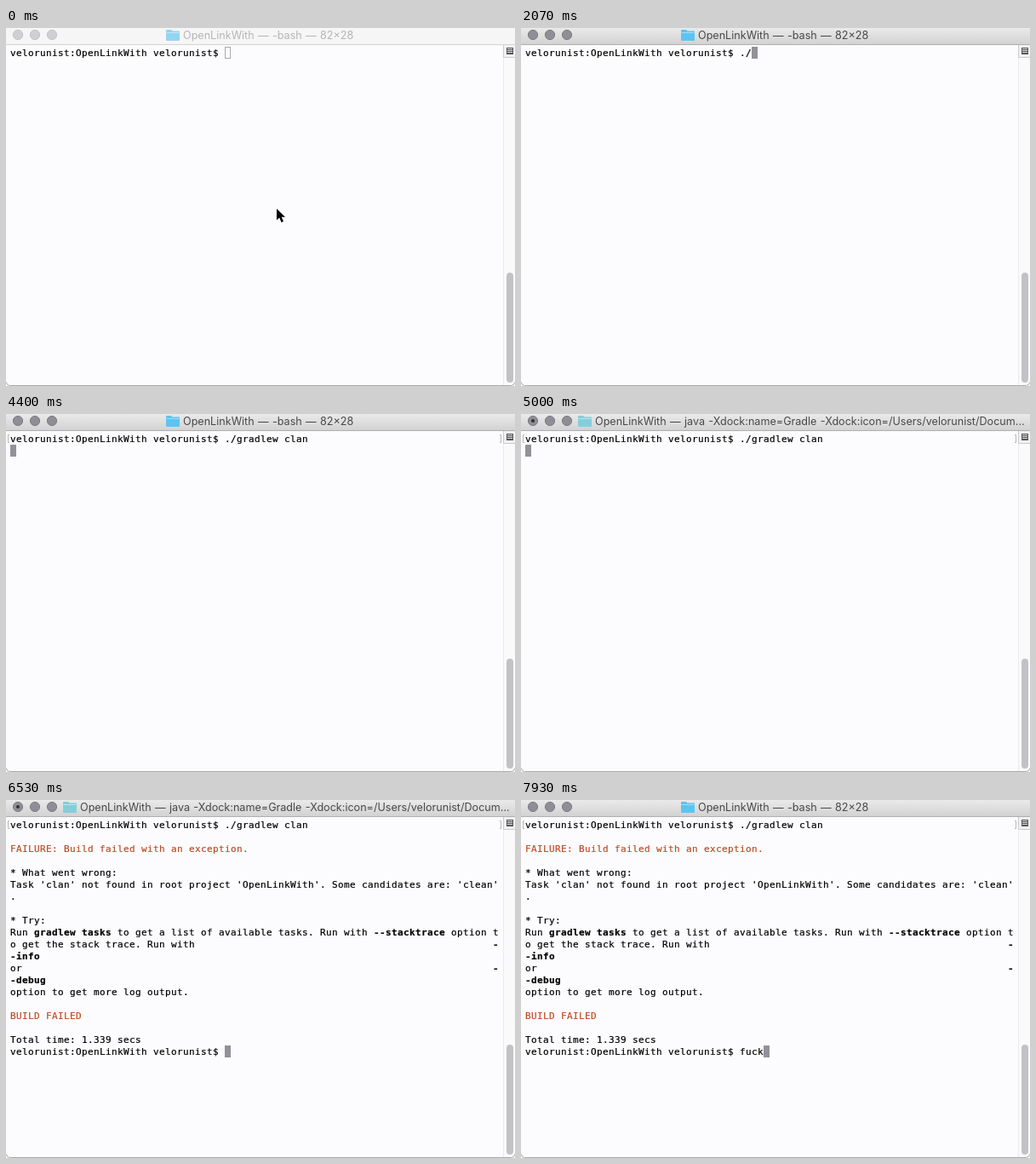
Recreate the animation shown at these times as an HTML page. Size 598x420 px, loop 8 s.

```html
<!DOCTYPE html>
<html lang="en">
<head>
<meta charset="utf-8">
<title>Terminal</title>
<style>
  html, body { margin: 0; width: 100%; height: 100%; overflow: hidden; background: #fcfcfe; }
  svg { display: block; width: 598px; height: 420px; }
  .mono { font: 11px "DejaVu Sans Mono", "Liberation Mono", monospace; stroke-width: .2; }
  .title { font: 12.6px Inter, Roboto, sans-serif; word-spacing: .8px; }
</style>
</head>
<body>
<svg id="stage" viewBox="0 0 598 420" xmlns="http://www.w3.org/2000/svg">
  <defs>
    <linearGradient id="activeBar" x2="0" y2="1">
      <stop offset="0" stop-color="#eaeaea"/>
      <stop offset="1" stop-color="#d2d2d2"/>
    </linearGradient>
  </defs>
  <rect width="598" height="420" fill="#fcfcfe"/>

  <g id="scrollbar">
    <rect x="584" y="20" width="14" height="399" fill="#fafafa"/>
    <path d="M584.5 20V419" stroke="#ebebee"/>
    <rect x="584.5" y="19.5" width="14" height="15" fill="#f2f2f2" stroke="#cbcbcd"/>
    <rect x="588.5" y="23.5" width="7" height="7" fill="#d6d6d8" stroke="#56565a"/>
    <path d="M589 25.5h6M589 27.5h6M589 29.5h6" stroke="#56565a"/>
    <rect x="588" y="287" width="8" height="129" rx="4" fill="#c2c1c5"/>
  </g>
  <path d="M.5 415.5Q.5 419.5 4.5 419.5H593.5Q597.5 419.5 597.5 415.5" fill="none" stroke="#a9a9ac"/>

  <rect id="bar" width="598" height="19"/>
  <path id="barEdge" d="M0 19.5H598"/>
  <g id="lights">
    <circle cx="14" cy="8" r="5.6"/>
    <circle cx="34" cy="8" r="5.6"/>
    <circle cx="54" cy="8" r="5.6"/>
  </g>
  <circle id="busyDot" cx="14" cy="8" r="2.1" fill="#333337"/>
  <g id="heading">
    <g id="folder">
      <path d="M0 3Q0 2 1 2H6L7.5 3.5H15Q16 3.5 16 4.5V14Q16 15 15 15H1Q0 15 0 14Z"/>
      <path d="M.5 5.5H15.5" stroke="#fff" stroke-opacity=".45"/>
    </g>
    <text id="title" class="title" x="20" y="13"></text>
  </g>

  <g id="screen" class="mono"></g>
  <rect id="caret"/>
  <path id="arrow" d="M0 0V13.5L3.2 10.6L5.5 16L8 15L5.7 9.8H10Z" fill="#000" stroke="#fff" stroke-width="1.2" paint-order="stroke"/>
  <path id="beam" d="M-3.5 -7.5Q-.5 -7.5 0 -5.5Q.5 -7.5 3.5 -7.5M0 -6V6M-3.5 7.5Q-.5 7.5 0 5.5Q.5 7.5 3.5 7.5M-1.5 .5H1.5" fill="none" stroke="#222"/>
</svg>
<script>
const LOOP = 8000, COL = 7, ROW = 14, LEFT = 5, TOP = 22;
const USER = 'velorunist', PROJECT = 'OpenLinkWith';
const PROMPT = `${USER}:${PROJECT} ${USER}$ `;
const T = { move: 930, active: 1067, type: 1600, enter: 4400, busy: 4467,
  javaTitle: 5000, configure: 5470, output: 5870, prompt: 6530, bashTitle: 6930 };

const COMMAND = './gradlew clan';
const COMMAND_KEYS = [1600, 1870, 2530, 2670, 2800, 2930, 3070, 3200, 3470, 3670, 3870, 4000, 4070, 4200];
const RETRY = 'fuck';
const RETRY_KEYS = [7600, 7670, 7800, 7930];

const BASH_TITLE = `${PROJECT} — -bash — 82×28`;
const JAVA_TITLE = `${PROJECT} — java -Xdock:name=Gradle -Xdock:icon=/Users/${USER}/Docum...`;

// "~" toggles bold, a leading "!" marks an error line
const OUTPUT = [
  '',
  '!FAILURE: Build failed with an exception.',
  '',
  '* What went wrong:',
  `Task 'clan' not found in root project '${PROJECT}'. Some candidates are: 'clean'`,
  '.',
  '',
  '* Try:',
  'Run ~gradlew tasks~ to get a list of available tasks. Run with ~--stacktrace~ option t',
  'o get the stack trace. Run with'.padEnd(81) + '~-',
  '~-info',
  'or'.padEnd(81) + '~-',
  '~-debug',
  'option to get more log output.',
  '',
  '!BUILD FAILED',
  '',
  'Total time: 1.339 secs'
];

const $ = id => document.getElementById(id);
const set = (id, attrs) => {
  for (const k in attrs) $(id).setAttribute(k, attrs[k]);
};
const show = (id, on) => set(id, { visibility: on ? 'visible' : 'hidden' });
const typed = (text, keys, t) => text.slice(0, keys.filter(k => t >= k).length);
const plain = line => line.replace(/^!|~/g, '');

function addToScreen(tag, attrs, text = '') {
  const node = document.createElementNS('http://www.w3.org/2000/svg', tag);
  for (const k in attrs) node.setAttribute(k, attrs[k]);
  node.textContent = text;
  $('screen').append(node);
}

function addLine(line, row) {
  const color = line[0] === '!' ? '#bd4a24' : '#000';
  let col = 0;
  line.replace(/^!/, '').split('~').forEach((text, i) => {
    const x = [...text].map((_, n) => LEFT + (col + n) * COL).join(' ');
    // no-break spaces keep the column grid intact
    if (text) addToScreen('text', {
      x, y: TOP + row * ROW + 11, fill: color, stroke: color,
      'font-weight': i % 2 ? 700 : 400
    }, text.replace(/ /g, '\u00a0'));
    col += text.length;
  });
}

function getLines(t) {
  const lines = [PROMPT + typed(COMMAND, COMMAND_KEYS, t)];
  if (t < T.enter) return lines;
  if (t < T.configure) return [...lines, ''];
  if (t < T.output) {
    const done = Math.min(2, Math.floor((t - T.configure) / 130));
    return [...lines, `~> Configuring > ${done}/2 projects`];
  }
  return [...lines, ...OUTPUT, t < T.prompt ? '' : PROMPT + typed(RETRY, RETRY_KEYS, t)];
}

let drawn = '';
function drawScreen(t, active) {
  const lines = getLines(t), key = lines.join('\n');
  if (key !== drawn) {
    drawn = key;
    $('screen').replaceChildren();
    lines.forEach(addLine);
    if (t >= T.enter) {
      addToScreen('path', {
        d: 'M4 24.5H2.5V33.5H4M580 24.5H581.5V33.5H580',
        fill: 'none', stroke: '#b5b5b8', 'stroke-width': 1
      });
    }
  }
  const row = lines.length - 1;
  const x = LEFT + plain(lines[row]).length * COL, y = TOP + row * ROW;
  set('caret', active
    ? { x, y, width: 7, height: 14, fill: '#929198', stroke: 'none' }
    : { x: x + .5, y: y + .5, width: 6, height: 13, fill: 'none', stroke: '#a9a9ad' });
}

function drawBar(t, active) {
  const java = t >= T.javaTitle && t < T.bashTitle;
  set('bar', { fill: active ? 'url(#activeBar)' : '#f6f6f6' });
  set('barEdge', { stroke: active ? '#b0b0b2' : '#d3d3d5' });
  set('lights', { fill: active ? '#8f8e96' : '#d0d0d3', stroke: active ? '#7d7c84' : '#c2c2c5' });
  show('busyDot', t >= T.busy && t < T.bashTitle);
  set('heading', { transform: `translate(${java ? 67 : 188} 0)` });
  set('folder', { fill: java ? '#86cdda' : active ? '#5cc4f2' : '#92d5f3' });
  set('title', { fill: active ? '#48484a' : '#b5b5b7' });
  const text = java ? JAVA_TITLE : BASH_TITLE;
  if ($('title').textContent !== text) $('title').textContent = text;
}

function drawPointer(t, active) {
  const p = Math.max(0, Math.min(1, (t - T.move) / 230));
  const e = p * p * (3 - 2 * p);
  const transform = `translate(${318 - 12.5 * e} ${212 - 46 * e})`;
  set('arrow', { transform });
  set('beam', { transform });
  show('arrow', !active);
  show('beam', active && t < T.type);
}

function render(t) {
  const active = t >= T.active;
  drawBar(t, active);
  drawScreen(t, active);
  drawPointer(t, active);
}

const start = performance.now();
function tick() {
  render((performance.now() - start) % LOOP);
  requestAnimationFrame(tick);
}
tick();
</script>
</body>
</html>
```
